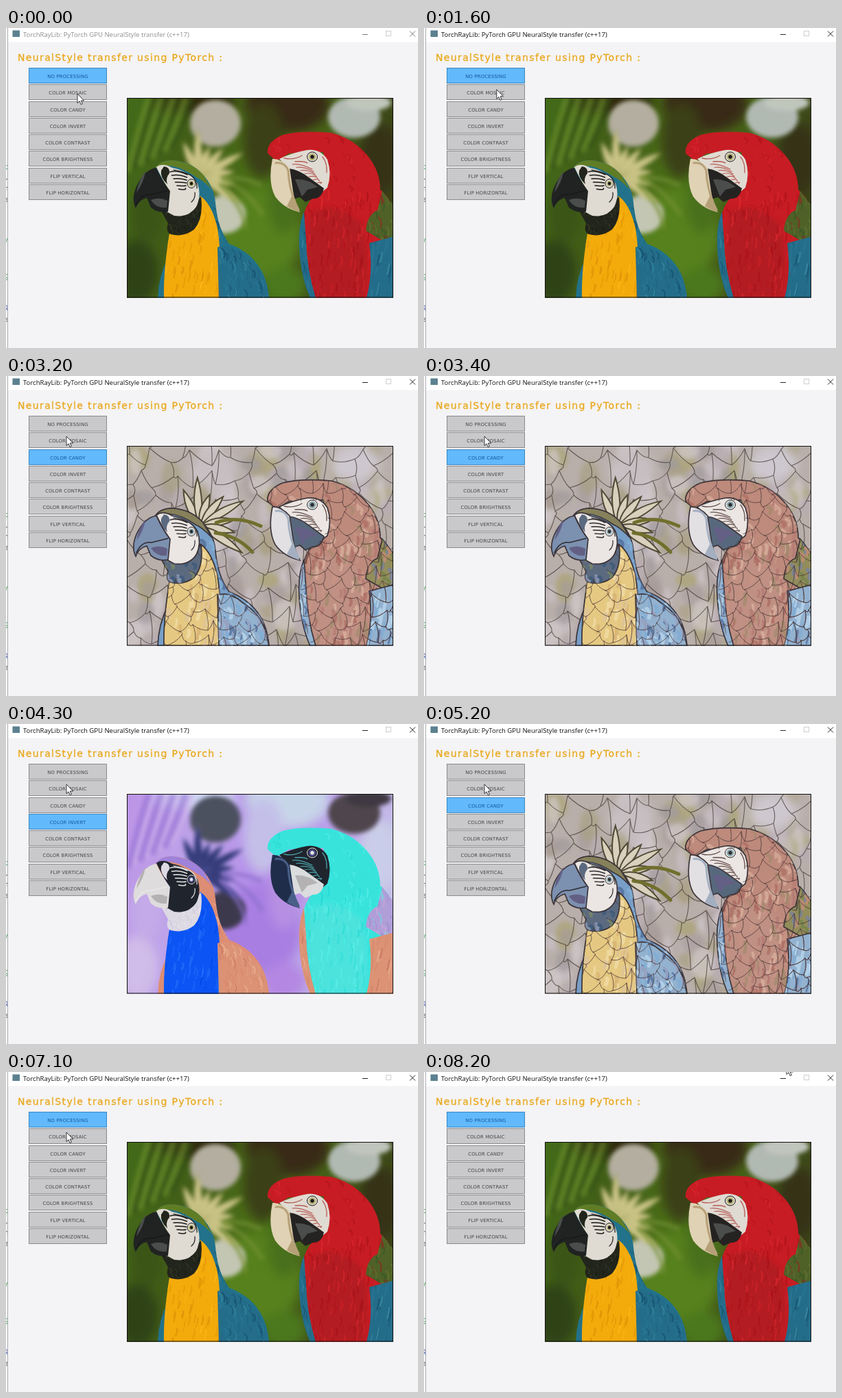
Write an HTML page that moves like this. It is 600 px wide and 467 px high and loops after 8400 ms.

```html
<!DOCTYPE html>
<html lang="en">
<head>
<meta charset="utf-8">
<title>Style transfer demo</title>
<style>
html, body { margin: 0; width: 100%; height: 100%; overflow: hidden; background: #f4f3f5; }
svg { display: block; width: 100vw; height: 100vh; }
.bar { font: 9.55px "Open Sans", "Noto Sans", sans-serif; }
.head { font: 14px "DejaVu Sans", sans-serif; letter-spacing: 1.36px; fill: #e9a81c; stroke: #e9a81c; stroke-width: .3; }
.label { font: 6.8px "DejaVu Sans", sans-serif; letter-spacing: .2px; text-anchor: middle; }
.code { font: 10px "Noto Sans Mono", monospace; text-anchor: end; }
</style>
</head>
<body>
<svg id="stage" viewBox="0 0 600 467" preserveAspectRatio="none" xmlns="http://www.w3.org/2000/svg"></svg>
<script>
const LOOP = 8400;
const stage = document.getElementById('stage');
let seed = 1;
const rnd = () => (seed = (seed * 16807) % 2147483647) / 2147483647;
const span = (a, b) => a + (b - a) * rnd();
const pick = list => list[Math.floor(rnd() * list.length)];
const path = (d, fill, more = '') => `<path d="${d}" fill="${fill}" ${more}/>`;
const line = (d, color, w, more = '') =>
  `<path d="${d}" fill="none" stroke="${color}" stroke-width="${w}" stroke-linecap="round" ${more}/>`;
const oval = (x, y, rx, ry, fill, more = '') =>
  `<ellipse cx="${x}" cy="${y}" rx="${rx}" ry="${ry}" fill="${fill}" ${more}/>`;
const rect = (x, y, w, h, fill, more = '') =>
  `<rect x="${x}" y="${y}" width="${w}" height="${h}" fill="${fill}" ${more}/>`;
const soft = b => `filter="url(#blur${b})"`;

const shape = {
  blueBack: 'M216 206Q224 193 242 193Q266 194 283 210Q303 230 305 255Q308 292 325 315Q352 325 367 346Q381 366 383 394H221Q222 362 236 335L250 250Z',
  crown: 'M217 205Q224 193 242 193Q270 195 287 214L300 236Q286 221 276 217Q255 202 236 201Z',
  gold: 'M283 245Q300 257 308 292Q314 330 309 352L311 394H230Q229 355 238 300L262 290Z',
  bib: 'M226 267L262 266L284 246Q288 278 274 294Q258 306 240 301Q232 298 236 285Z',
  face1: 'M219 203Q228 196 242 204Q270 210 279 227Q285 245 277 261Q266 277 245 274L234 268L238 237Q228 222 219 203Z',
  beak1: 'M219 204Q202 206 190 231Q182 250 189 263Q193 251 205 248L211 262Q222 271 236 268L239 238Q229 226 219 204Z',
  wing1: 'M308 320Q325 313 345 331Q368 345 378 372L383 394H310Z',
  redBody: 'M381 183Q379 166 403 156Q430 149 474 153Q508 162 528 188Q545 210 545 236Q562 250 566 275V394H446Q431 360 429 318Q427 286 437 262L447 245L463 235L470 214L462 181L412 183L394 194Z',
  belly: 'M446 268Q480 250 518 286Q533 335 521 394H452Q430 330 446 268Z',
  face2: 'M398 191Q416 182 439 178Q458 176 468 192Q475 212 468 233L462 238L433 217L413 206Z',
  beak2: 'M388 191Q400 190 413 204L417 231Q420 255 428 269Q404 263 392 246Q381 225 388 191Z',
  jaw2: 'M412 205Q427 207 441 218L463 234Q459 250 447 249L436 254L428 247L418 250L414 230Z',
  wing2: 'M434 268Q425 290 427 320Q429 363 443 394H451Q438 351 437 311Z',
  mantle: 'M548 238L566 262V322L545 308L524 296Q526 272 541 266Z',
  wing3: 'M529 314L566 304V394H525Q535 355 529 314Z'
};
const defs = Object.entries(shape)
  .map(([id, d]) => `<clipPath id="c-${id}"><path d="${d}"/></clipPath>`).join('') +
  '<clipPath id="frame"><rect x="176" y="102" width="388" height="292"/></clipPath>' +
  '<clipPath id="edge"><rect width="2.6" height="467"/></clipPath>' +
  [3, 8].map(b => `<filter id="blur${b}" x="-50%" y="-50%" width="200%" height="200%"><feGaussianBlur stdDeviation="${b}"/></filter>`).join('') +
  '<linearGradient id="woods" x2="1" y2=".25"><stop stop-color="#426b19"/><stop offset=".3" stop-color="#435d18"/>' +
  '<stop offset=".6" stop-color="#4d7518"/><stop offset="1" stop-color="#3b4219"/></linearGradient>';

// Scattered strokes kept inside one body part
function plumage(part, x0, x1, y0, y1, count, colors, slope, len, width, alpha) {
  let out = '';
  for (let i = 0; i < count; i++) {
    const x = span(x0, x1), y = span(y0, y1), l = span(.5, 1) * len;
    out += line(`M${x.toFixed(1)} ${y.toFixed(1)}q${(slope * l + 3).toFixed(1)} ${(l * .3).toFixed(1)} ${(slope * l).toFixed(1)} ${l.toFixed(1)}`,
      pick(colors), (width * span(.5, 1.2)).toFixed(1));
  }
  return `<g clip-path="url(#c-${part})" opacity="${alpha}">${out}</g>`;
}

// Tapered blades that spread from behind the left head
function leafFan(fill, edge, width) {
  let out = '';
  for (let i = 0; i < 8; i++) {
    const len = 58 + 14 * Math.sin(i * 2), turn = -112 + i * 21;
    out += path(`M0 0Q${len * .45} -15 ${len} -3Q${len * .5} 7 0 0Z`, fill,
      `transform="translate(283 219) rotate(${turn})" stroke="${edge}" stroke-width="${width}"`);
  }
  return out;
}

function parrots(p) {
  const k = p.line ? `stroke="${p.line}" stroke-width="${p.w}"` : '';
  const part = (id, fill) => path(shape[id], fill, k);
  const f = p.feather;
  let s = part('blueBack', p.blue) +
    plumage('blueBack', 255, 380, 195, 390, 70 * f.n, p.blues, .4, f.len, f.w, .8) +
    part('crown', p.crown) + part('gold', p.gold) +
    plumage('gold', 228, 312, 250, 390, 80 * f.n, p.golds, -.15, f.len, f.w, .65) +
    part('wing1', p.wing) +
    plumage('wing1', 306, 380, 315, 390, 60 * f.n, p.blues, .25, f.len, f.w, .8) +
    part('bib', p.bib) + plumage('bib', 228, 284, 255, 300, 20 * f.n, p.bibs, .4, 8, f.w, .8) +
    part('face1', p.face) + part('beak1', p.beak) +
    path('M203 209Q193 222 190 240Q201 225 203 209Z', p.shine) +
    path('M211 251Q224 246 235 252L234 262Q219 264 211 251Z', p.shine) +
    line('M190 258Q197 241 212 243L236 237', p.dark, 1.5) +
    path('M230 202Q239 203 238 212Q232 219 235 228Q224 218 226 208Z', p.bib);
  for (let i = 0; i < 6; i++)
    s += line(`M${239 + i * 2.5} ${210 + i * 5}q11 ${-3 + i} ${25 - i * 3} ${4 - i}`, p.dark, 1.5);
  s += line('M244 207q13 2 25 8q10 7 9 19M275 240q1 9-5 14', p.dark, 1.2);
  s += oval(270, 227, 6, 6.5, p.face, `stroke="${p.dark}"`) + oval(270, 227, 4, 4.3, p.iris) + oval(270, 227, 2.2, 2.4, p.dark);

  s += part('redBody', p.red) +
    `<g clip-path="url(#c-redBody)">${path(shape.belly, p.belly, soft(3))}</g>` +
    plumage('redBody', 385, 545, 155, 270, 70 * f.n, p.reds, .5, f.len * .7, f.w, .6) +
    plumage('redBody', 430, 562, 235, 390, 150 * f.n, p.reds, -.05, f.len, f.w, .7) +
    part('mantle', p.mantle) + plumage('mantle', 525, 563, 240, 315, 24 * f.n, p.mantles, .2, f.len, f.w, .8) +
    part('wing3', p.wing) + plumage('wing3', 525, 563, 305, 390, 24 * f.n, p.blues, -.2, f.len * 1.4, f.w, .8) +
    part('wing2', p.wing) + plumage('wing2', 427, 442, 268, 380, 16 * f.n, p.blues, .1, f.len * 1.4, f.w * .6, .8) +
    part('face2', p.face) + part('jaw2', p.jaw) +
    path('M421 221Q438 219 454 232L439 236L431 246Z', p.shine) +
    part('beak2', p.ivory) + line('M393 197Q406 195 411 208Q412 238 426 265', p.tip, 3) +
    path('M417 244Q421 259 428 269Q416 265 409 260Z', p.tip);
  for (let i = 0; i < 7; i++)
    s += line(`M${417 + i * 6} ${199 + i * 4.5}q10 -2 ${29 - i * 4} ${7 - i}`, p.stripe, 1.2);
  s += line('M405 190q15 3 26-4M421 195q13-1 18 2M461 188q7 9 6 23', p.stripe, 1.3);
  return s + oval(446, 188, 7.5, 7, p.face, `stroke="${p.dark}"`) + oval(446, 188, 5.3, 5.3, p.iris) + oval(446, 188, 2.7, 2.8, p.dark);
}

function photo() {
  seed = 11;
  let s = rect(176, 102, 388, 292, 'url(#woods)');
  const blobs = oval(275, 108, 60, 18, '#33290f') + oval(410, 112, 62, 42, '#392b12') + oval(375, 165, 30, 55, '#3a4014') +
    oval(545, 190, 30, 50, '#363118') + oval(190, 355, 32, 46, '#2f4312') + oval(205, 275, 24, 40, '#3a5512') +
    oval(370, 300, 60, 65, '#57811c') + oval(405, 250, 24, 50, '#4a701d') + oval(405, 375, 32, 26, '#4c781b');
  s += `<g ${soft(8)}>${blobs}</g>`;
  let leaves = '';
  for (let i = 0; i < 8; i++)
    leaves += line(`M${178 + i * 9} ${208 - i * 5}Q${193 + i * 9} 145 ${207 + i * 9} 104`, i % 2 ? '#324d12' : '#6b8f2c', 7);
  s += `<g ${soft(3)} opacity=".75">${leaves}</g><g ${soft(3)}>` +
    oval(305, 139, 37, 34, '#b3ae9f') + oval(507, 130, 38, 30, '#b1b9b3') + oval(528, 109, 33, 12, '#c1c6bd') +
    oval(318, 272, 31, 28, '#c3c6b2') + leafFan('#cfc78b', '#8d9443', 1) + '</g>';
  s += line('M318 222Q353 238 373 272M312 228Q346 262 349 292M314 218Q347 217 371 229', '#769135', 4, soft(3));
  return s + parrots({
    blue: '#22728b', blues: ['#16506d', '#3a8ca3', '#287897', '#1f617d'], crown: '#607d25',
    gold: '#f3aa0b', golds: ['#ffbd1c', '#e09705', '#f8b411', '#d88a06'], wing: '#246d8a',
    bib: '#22251b', bibs: ['#343a25', '#1a1c16'], face: '#e0dbd2', beak: '#202322', shine: '#4a4d4c', dark: '#181918', iris: '#b9b47c',
    red: '#c71c23', belly: '#b31a22', reds: ['#a61119', '#df2930', '#b3141d', '#cf2229'], mantle: '#4f6126',
    mantles: ['#365829', '#872d24', '#627334'], jaw: '#252321', ivory: '#e0d2b4', tip: '#b6a078', stripe: '#b45d58',
    feather: { n: 1, len: 15, w: 2 }
  });
}

function mosaic() {
  seed = 37;
  let s = rect(176, 102, 388, 292, '#b9a56c');
  for (let i = 0; i < 260; i++) {
    const x = span(170, 565), y = span(105, 410), a = span(2, 24), w = span(6, 12);
    const d = `M${x.toFixed()} ${y.toFixed()}q${(a / 5).toFixed()} -15 ${a.toFixed()} -22`;
    s += line(d, '#86765a', (w + 1.6).toFixed(1)) +
      line(d, pick(['#d9bc50', '#aaa08a', '#c8b896', '#e2cc6b', '#a3967f', '#c7a849', '#b9b09c']), w.toFixed(1));
  }
  s += oval(303, 133, 30, 25, '#c6c4bd', soft(3)) + oval(508, 126, 34, 27, '#d3d8d9', soft(3)) +
    oval(322, 273, 29, 24, '#e4e6e0', soft(3)) +
    line('M383 214Q367 162 407 147Q434 139 474 149', '#433c38', 9, soft(3)) + leafFan('#e7dfc4', '#57412f', 4);
  for (const [x, y, rx, ry] of [[227, 129, 8, 15], [245, 113, 10, 7], [199, 132, 11, 17], [345, 151, 12, 15], [348, 181, 11, 17],
    [393, 143, 17, 8], [358, 114, 9, 7], [189, 297, 10, 11], [210, 323, 9, 7]])
    s += oval(x, y, rx, ry, '#651d25', 'stroke="#493435" stroke-width="2"');
  s += parrots({
    blue: '#65a5d4', blues: ['#1f2d47', '#b9dcee', '#519dd4', '#2b2830', '#78b8e2'], crown: '#816831',
    gold: '#dfb638', golds: ['#f2ce4d', '#c2952c', '#e7bf3c', '#b88b35'], wing: '#69b0dd',
    bib: '#31201c', bibs: ['#5a2922', '#221815', '#7b5a36'], face: '#eee7d5', beak: '#381719', shine: '#753135', dark: '#211817', iris: '#c4ad71',
    red: '#ac222b', belly: '#8d1c27', reds: ['#6d1420', '#ce3039', '#ba2630', '#48161f', '#c4343b'], mantle: '#9e3137',
    mantles: ['#6b202b', '#c07368', '#4b3e4c'], jaw: '#271e22', ivory: '#efe8d6', tip: '#80786f', stripe: '#6c2d2d',
    line: '#302321', w: 2, feather: { n: .9, len: 15, w: 4.2 }
  });
  for (const [x, y, c] of [[252, 192, '#77613a'], [328, 317, '#eee2bd']])
    s += oval(x, y, 11, 14, c, 'stroke="#493527" stroke-width="2"') + oval(x, y, 8, 10.5, '#332422') +
      oval(x, y, 5, 7, c) + oval(x, y, 2.3, 4, '#403029');
  return s;
}

// Jittered brick cells make the leaded outlines
function cracks(dx, dy) {
  const at = (i, j) => {
    const n = i * 127 + j * 311 + 900;
    return [160 + i * dx + dx * .4 * Math.sin(n * 1.7), 85 + j * dy + dy * .4 * Math.sin(n * 2.9)];
  };
  let d = '';
  for (let j = 0; j * dy < 320; j++) for (let i = 0; i * dx < 420; i++) {
    const [x, y] = at(i, j), [u, v] = at(i + 1, j);
    d += `M${x.toFixed()} ${y.toFixed()}Q${((x + u) / 2).toFixed()} ${((y + v) / 2 + 5).toFixed()} ${u.toFixed()} ${v.toFixed()}`;
    if ((i + j) % 2) {
      const [a, b] = at(i, j + 1);
      d += `M${x.toFixed()} ${y.toFixed()}Q${((x + a) / 2 + 4).toFixed()} ${((y + b) / 2).toFixed()} ${a.toFixed()} ${b.toFixed()}`;
    }
  }
  return d;
}

function candy() {
  seed = 71;
  let s = rect(176, 102, 388, 292, '#b9afaa'), tint = '';
  for (let i = 0; i < 170; i++)
    tint += oval(span(176, 564).toFixed(), span(102, 394).toFixed(), span(7, 18).toFixed(), span(8, 24).toFixed(),
      pick(['#a9a083', '#cbc0c8', '#b8abb4', '#a09a9c', '#aaa36f', '#d3cbcf', '#a79b99']), 'opacity=".7"');
  s += `<g ${soft(3)}>${tint}</g>` + oval(303, 137, 33, 28, '#c6bfc2', soft(8)) + oval(508, 129, 36, 28, '#cdc8cf', soft(8)) +
    line(cracks(19, 33), '#463c37', 1.1, 'opacity=".75"') +
    leafFan('#d9d0bd', '#514a34', 2) +
    line('M306 214Q337 203 371 219M305 229Q337 233 359 257', '#716f2d', 5);
  s += parrots({
    blue: '#789fc7', blues: ['#536f9c', '#b8d5ec', '#81add4', '#969fbd'], crown: '#86815b',
    gold: '#e5c982', golds: ['#f3e0ae', '#d5ae70', '#ecca84', '#dcc2a0'], wing: '#93b2d0',
    bib: '#5c6a80', bibs: ['#3c5a78', '#7b8a62', '#8f9cb8'], face: '#ebe6e3', beak: '#7c90b0', shine: '#635f85', dark: '#2e2b2d', iris: '#8fadb5',
    red: '#bd8a7c', belly: '#bf9083', reds: ['#aa6860', '#dcb4a2', '#b37873', '#c99585', '#a08a6c'], mantle: '#938d5b',
    mantles: ['#74844a', '#c58d79', '#7a83a0'], jaw: '#57687d', ivory: '#e3e0e3', tip: '#a4b0c2', stripe: '#654e4a',
    line: '#3b3439', w: 1.7, feather: { n: .9, len: 15, w: 5 }
  });
  const net = cracks(13, 20);
  for (const id of ['gold', 'wing1', 'redBody', 'wing3'])
    s += `<g clip-path="url(#c-${id})">${line(net, '#4a3535', 1, 'opacity=".75"')}</g>`;
  return s;
}

const names = ['NO PROCESSING', 'COLOR MOSAIC', 'COLOR CANDY', 'COLOR INVERT', 'COLOR CONTRAST', 'COLOR BRIGHTNESS', 'FLIP VERTICAL', 'FLIP HORIZONTAL'];
const buttons = names.map((name, i) => {
  const y = Math.round(58 + i * 24.25) + .5;
  return `<g class="button">${rect(33.5, y, 113, 22, '#c9c8ca', 'stroke="#8b8b8d"')}<text class="label" x="90" y="${y + 14}">${name}</text></g>`;
}).join('');
const scraps = [['p', 206, '#3f9a56'], ['_', 219, '#555'], ['n', 238, '#555'], ['a', 254, '#555'], ['/', 315, '#3f9a56'],
  ['g', 365, '#3f9a56'], ['R', 413, '#4356b5'], ['a', 429, '#555']]
  .map(([c, y, color]) => `<text class="code" x="3.5" y="${y}" fill="${color}">${c}</text>`).join('');
const original = photo();
const views = [original, mosaic(), candy(), original]
  .map((v, i) => `<g class="view" ${i === 3 ? 'style="filter:invert(1)"' : ''}>${v}</g>`).join('');

stage.innerHTML = `<defs>${defs}</defs>` + rect(0, 0, 600, 467, '#f4f3f5') + rect(0, 0, 600, 20.5, '#fff') +
  rect(0, 20, 2, 447, '#fafafa') + `<g clip-path="url(#edge)">${scraps}</g>` + rect(2, 0, 1, 467, '#a9a9ab') +
  rect(9.5, 3.5, 10.5, 9.5, '#5b8190') +
  '<text class="bar" id="title" x="25" y="13">TorchRayLib: PyTorch GPU NeuralStyle transfer (c++17)</text>' +
  '<g id="controls" fill="none"><path d="M519 9.5h8M588 4.5l8 8m0-8l-8 8"/></g>' +
  rect(553.5, 4.5, 7, 7, 'none', 'stroke="#cfcfcf"') +
  '<text class="head" x="17" y="48">NeuralStyle transfer using PyTorch :</text>' + buttons +
  `<g clip-path="url(#frame)">${views}</g>` + rect(176.5, 102.5, 387, 290.5, 'none', 'stroke="#111"') +
  '<path id="cursor" d="M0 0V13.6L3.1 10.8L5.2 15.6L7.4 14.6L5.3 10H9.6Z" fill="#fff" stroke="#222" stroke-width=".9"/>';

const $ = id => document.getElementById(id);
const viewNodes = [...stage.querySelectorAll('.view')];
const buttonNodes = [...stage.querySelectorAll('.button')];
const picks = [[0, 0], [2200, 1], [3200, 2], [4250, 3], [5200, 2], [6100, 1], [7100, 0]];
const moves = [[950, 1150, 104, 96, 118, 91], [1250, 2050, 118, 91, 88, 88], [7350, 8200, 88, 88, 528, -10]];
const ease = u => u * u * (3 - 2 * u);

function draw(now) {
  const t = Math.floor((now % LOOP) / 50) * 50;
  const mode = picks.filter(p => p[0] <= t).pop()[1];
  viewNodes.forEach((v, i) => v.style.display = i === mode ? '' : 'none');
  buttonNodes.forEach((b, i) => {
    const on = i === mode, [box, label] = b.children;
    box.setAttribute('fill', on ? '#62b9fc' : '#c9c8ca');
    box.setAttribute('stroke', on ? '#3988c2' : '#8b8b8d');
    label.setAttribute('fill', on ? '#1257a0' : '#444447');
  });
  const active = t >= 1500;
  $('title').setAttribute('fill', active ? '#111' : '#8d8d8d');
  $('controls').setAttribute('stroke', active ? '#222' : '#777');
  let x = 104, y = 96;
  for (const [a, b, x0, y0, x1, y1] of moves) if (t > a) {
    const u = ease(Math.min(1, (t - a) / (b - a)));
    x = x0 + (x1 - x0) * u;
    y = y0 + (y1 - y0) * u;
  }
  $('cursor').setAttribute('transform', `translate(${x.toFixed(1)} ${y.toFixed(1)})`);
}
const start = performance.now();
function tick() {
  draw(performance.now() - start);
  requestAnimationFrame(tick);
}
tick();
</script>
</body>
</html>
```
